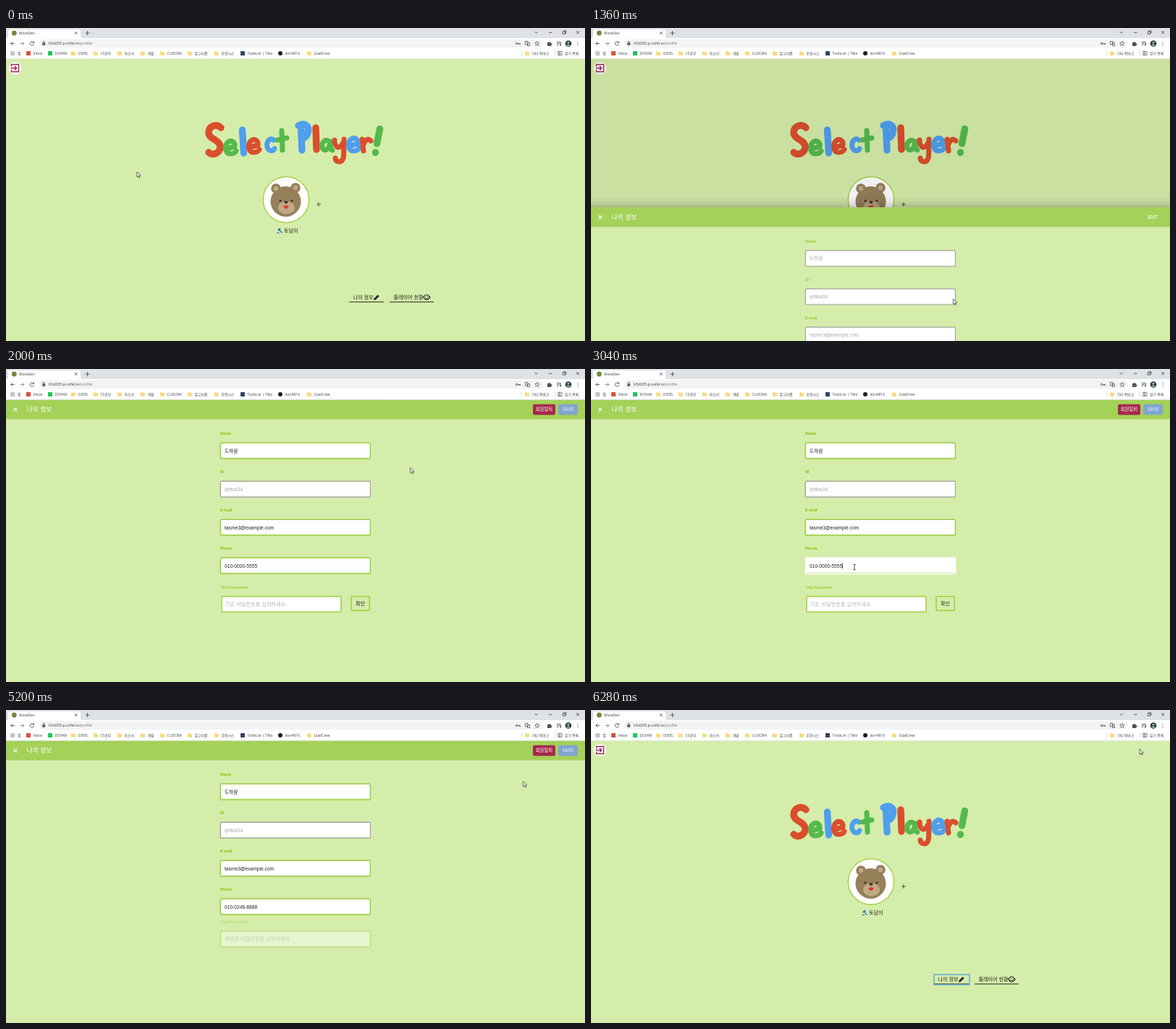
Write an HTML page that moves like this. It is 800 px wide and 433 px high and loops after 6.32 s.

```html
<!DOCTYPE html>
<html lang="ko">
<head>
<meta charset="utf-8">
<title>Profile</title>
<style>
html, body { margin: 0; width: 100%; height: 100%; overflow: hidden; background: #d5edaa; }
svg { display: block; width: 800px; height: 433px; overflow: hidden; }
text { font: 4.9px "Open Sans", "Noto Sans CJK KR", sans-serif; fill: #3c4043; white-space: pre; }
.ko { font: 7.1px "Noto Sans CJK KR", sans-serif; fill: #222; }
.label { font: bold 5.5px "Liberation Sans", sans-serif; fill: #9acd32; }
.value { font: 6.67px "Liberation Sans", "Noto Sans CJK KR", sans-serif; fill: #222; }
.value.off { fill: #a8a8a8; }
.hint { font: 7.2px "Noto Sans CJK KR", sans-serif; fill: #b5b5b5; }
.bar { font: 500 6.4px Roboto, "Noto Sans CJK KR", sans-serif; fill: #fff; }
.heading { font: 8.8px "Noto Sans CJK KR", sans-serif; fill: #fff; }
.line { fill: none; stroke: #505357; stroke-width: .9; }
.box { fill: #fff; stroke: #a2d149; stroke-width: 1.6; }
.box.off { stroke: #a3a59c; stroke-width: 1.2; }
.letters { fill: none; stroke-width: 7; stroke-linecap: round; stroke-linejoin: round; }
.letters .bold { stroke-width: 9.4; }
.red { stroke: #da4e2c; } .green { stroke: #55b94c; } .blue { stroke: #4f9fee; }

#sheet, #dim, #cursor, #fresh { animation: 6320ms linear infinite; }
#edit, #old, #phoneFocus, #passFocus, #key, #ring, #beam, #arrow { animation: 6320ms step-end infinite; }
#sheet { animation-name: slide; }
#dim { animation-name: dim; }
#cursor { animation-name: travel; }
#fresh { animation-name: fresh; }
#edit { animation-name: edit; }
#old { animation-name: old; }
#phoneFocus { animation-name: phoneFocus; }
#passFocus { animation-name: passFocus; }
#key { animation-name: key; }
#ring { animation-name: ring; }
#beam { animation-name: beam; }
#arrow { animation-name: arrow; }

@keyframes slide {
  0%, 20.877% { transform: translateY(391px); visibility: hidden; animation-timing-function: cubic-bezier(0,0,.2,1); }
  24.437%, 88.608% { transform: translateY(0); visibility: visible; animation-timing-function: cubic-bezier(.4,0,.6,1); }
  91.693%, 100% { transform: translateY(391px); visibility: hidden; }
}
@keyframes dim {
  0%, 20.877% { opacity: 0; animation-timing-function: cubic-bezier(.4,0,.2,1); }
  24.437%, 88.608% { opacity: .5; animation-timing-function: cubic-bezier(.4,0,.2,1); }
  91.693%, 100% { opacity: 0; }
}
@keyframes fresh {
  0%, 81.171% { opacity: 0; transform: translateY(-15px); }
  83.703%, 100% { opacity: 1; transform: translateY(0); }
}
@keyframes edit { 0% { opacity: 0; } 29.747% { opacity: 1; } 85.443%, 100% { opacity: 0; } }
@keyframes old { 0% { opacity: 1; } 81.013%, 100% { opacity: 0; } }
@keyframes phoneFocus { 0% { opacity: 0; } 42.405% { opacity: 1; } 69.62%, 100% { opacity: 0; } }
@keyframes passFocus { 0% { opacity: 0; } 69.62% { opacity: 1; } 80.38%, 100% { opacity: 0; } }
@keyframes key { 0% { opacity: 1; } 53.797% { opacity: 0; } 72.785%, 100% { opacity: 1; } }
@keyframes ring { 0% { opacity: 0; } 88.608%, 100% { opacity: 1; } }
@keyframes beam { 0% { opacity: 0; } 39.557% { opacity: 1; } 61.392% { opacity: 0; } 68.829% { opacity: 1; } 78.481%, 100% { opacity: 0; } }
@keyframes arrow { 0% { opacity: 1; } 39.557% { opacity: 0; } 61.392% { opacity: 1; } 68.829% { opacity: 0; } 78.481%, 100% { opacity: 1; } }
@keyframes travel {
  0% { transform: translate(181px,199px); }
  7.911% { transform: translate(230px,215px); }
  14.24% { transform: translate(440px,345px); }
  18.99% { transform: translate(498px,374px); }
  22.15% { transform: translate(501px,375px); }
  26.58% { transform: translate(690px,150px); }
  28.48% { transform: translate(776px,54px); }
  30.38% { transform: translate(783px,52px); }
  31.646% { transform: translate(559px,136px); }
  36.7% { transform: translate(430px,312px); }
  39.87%, 61.7% { transform: translate(364px,274px); }
  63.92%, 67.1% { transform: translate(260px,265px); }
  68.99%, 77.5% { transform: translate(372px,325px); }
  79.43% { transform: translate(488px,325px); }
  80.7% { transform: translate(490px,325px); }
  82.278% { transform: translate(714px,99px); }
  84.18% { transform: translate(775px,54px); }
  85.76% { transform: translate(778px,55px); }
  88.29% { transform: translate(13px,56px); }
  89.24% { transform: translate(14px,57px); }
  92.405% { transform: translate(158px,270px); }
  97.15% { transform: translate(740px,70px); }
  98.73%, 100% { transform: translate(758px,54px); }
}
</style>
</head>
<body>
<svg viewBox="0 0 800 433">
  <defs>
    <path id="e" d="M-6 2L5-1C6-7 1-10-3-8C-10-4-9 9-1 9C3 9 6 7 7 5"/>
    <path id="folder" fill="#f9d978" d="M0-2.7h2.4l.8.9H6v4.6H0z"/>
    <linearGradient id="shade" x2="0" y2="1">
      <stop offset="0" stop-opacity="0"/><stop offset=".5" stop-opacity=".04"/><stop offset="1" stop-opacity=".17"/>
    </linearGradient>
  </defs>

  <g id="page">
    <rect y="42" width="800" height="391" fill="#d5edaa"/>
    <circle cx="12.5" cy="55.5" r="8.6" fill="#fff"/>
    <path d="M7.5 53.5v-3h10v10h-10v-3M6.5 55.5h8M12 52.8l2.7 2.7-2.7 2.7" fill="none" stroke="#9a2150" stroke-width="1.4" stroke-linejoin="round"/>

    <g class="letters" role="img" aria-label="Select Player!">
      <path class="red bold" d="M297 138C291 132 280 135 280 145C281 155 296 154 296 165C295 174 285 177 280 172"/>
      <use class="green" href="#e" x="311" y="165"/>
      <path class="blue bold" d="M326.500 141L328.500 173"/>
      <use class="red" href="#e" x="343" y="163"/>
      <path class="blue" d="M370 155C365 150 359 158 361 165C363 171 369 171 371 167"/>
      <path class="green" d="M381 142L382 169M375 155L388 152"/>
      <path class="blue bold" d="M407.500 137L409 169M404 135C413 130 419 136 417.500 143C416.500 149 413 152 409 153"/>
      <path class="red bold" d="M428 138L429 168"/>
      <path class="green" d="M447 158C442 151 435 159 437 166C440 172 447 168 448 157C448 163 448 168 451 169"/>
      <path class="red" d="M454 155C454 166 461 168 465 160M467 154C466 170 469 184 461 185C457 185 455 183 455 180"/>
      <use class="blue" href="#e" x="481" y="161"/>
      <path class="red" d="M492 154L494 170M494 161C496 155 500 152 504 156"/>
      <path class="green bold" d="M516.500 139.500L512.500 160M510.500 172v.4"/>
    </g>

    <circle cx="387" cy="237.5" r="31.7" fill="#fff" stroke="#9acd32" stroke-width="1.3"/>
    <g fill="#96805a">
      <circle cx="373" cy="222" r="6.8"/><circle cx="400" cy="221" r="6.8"/>
      <circle cx="386.5" cy="240" r="21"/>
    </g>
    <g fill="#bfa987">
      <circle cx="373" cy="222" r="3.2"/><circle cx="400" cy="221" r="3.2"/>
      <ellipse cx="387.5" cy="248.5" rx="11.5" ry="9"/>
    </g>
    <g fill="#3b2a20">
      <circle cx="379" cy="239" r="1.4"/><circle cx="395" cy="239" r="1.4"/>
      <ellipse cx="387" cy="241" rx="2.6" ry="1.8"/>
    </g>
    <path d="M383.5 246q3.5-1.5 7 0q-.5 4-3.5 4t-3.5-4z" fill="#df3f2b"/>
    <path d="M428.8 244h6M431.8 241v6" stroke="#333" stroke-width=".8"/>
    <g stroke="#2374b8" fill="none"><path stroke-width="2.4" d="M376 280l3-2.6"/><path stroke-width="1.2" d="M377.5 279.5l4 4M374 283.5h4"/></g>
    <text class="ko" x="384" y="282.6">토담이</text>

    <text class="ko" x="479.5" y="374.8">나의 정보</text>
    <path d="M508 376.5l.6-2.4 5-5 2 2-5 5z" fill="#222"/>
    <text class="ko" x="535.5" y="374.8">플레이어 현황</text>
    <g class="line" style="stroke:#222;stroke-width:1">
      <circle cx="581.2" cy="372.5" r="3.7"/><path d="M578.8 373.5q2.4 2.4 4.8 0M579.5 371.3h1M582 371.3h1M577.5 371l-1.5 1.5 1.5 1.5M585 371l1.5 1.5-1.5 1.5"/>
      <path stroke-width="1.2" d="M474.5 379h47.5M530 379h61"/>
    </g>
    <rect id="ring" x="474" y="366" width="49" height="14" fill="none" stroke="#4a9ae0" stroke-width="1.2"/>
  </g>

  <rect id="dim" y="42" width="800" height="391"/>

  <g id="sheet">
    <rect y="26.5" width="800" height="16" fill="url(#shade)"/>
    <rect y="42.5" width="800" height="391" fill="#d5edaa"/>
    <rect y="69" width="800" height="1" fill="#c6e094"/>
    <rect y="42.5" width="800" height="26.7" fill="#a4d158"/>
    <path d="M10.4 53.6l5 5M15.4 53.6l-5 5" stroke="#fff" stroke-width="1.1"/>
    <text class="heading" x="28.5" y="59.2">나의 정보</text>
    <text class="bar" x="769.5" y="58.4">EDIT</text>
    <g id="view"></g>
    <g id="edit">
      <rect x="728" y="48.8" width="31" height="14.6" rx="1.8" fill="#a5284b"/>
      <text class="bar" x="743.5" y="58.4" text-anchor="middle">회원탈퇴</text>
      <rect x="763" y="48.8" width="27" height="14.6" rx="1.8" fill="#80a6cf"/>
      <text class="bar" x="776.5" y="58.4" text-anchor="middle" style="fill:#d3e4f3">SAVE</text>
      <g id="fields"></g>
      <g id="phoneFocus">
        <rect x="295.5" y="260.3" width="209" height="24" fill="#fff"/>
        <path d="M297 282.3h206" stroke="#bfe07e" stroke-width=".9"/>
        <text class="value phone" x="302" y="274.6"></text>
        <path class="caret" d="M0 268.5v7.5" stroke="#111" stroke-width=".7"/>
      </g>
      <g id="old">
        <text class="label" x="297" y="303.5">Old Password</text>
        <rect class="box" x="298" y="314.6" width="165" height="21.4" rx="1"/>
        <g id="passFocus">
          <rect x="297" y="313.5" width="167" height="24" fill="#fff"/>
          <path d="M299 335.5h163" stroke="#bfe07e" stroke-width=".9"/>
          <path class="caret" d="M0 321v7.5" stroke="#111" stroke-width=".7"/>
        </g>
        <text id="hint" class="hint" x="303" y="327.6">기존 비밀번호를 입력하세요</text>
        <text id="pass" class="value" x="303.5" y="327.4"></text>
        <rect x="477" y="314.6" width="25.3" height="19.4" rx="1" fill="none" stroke="#9acd32" stroke-width="1.4"/>
        <text class="ko" x="489.6" y="326.8" text-anchor="middle">확인</text>
      </g>
      <g id="fresh">
        <text class="label" x="296" y="303.5">New Password</text>
        <rect class="box" x="296.4" y="314.6" width="207" height="21.4" rx="1"/>
        <text class="hint" x="302" y="327.6">새로운 비밀번호를 입력하세요</text>
      </g>
    </g>
  </g>

  <g id="browser">
    <rect width="800" height="42.5" fill="#fff"/>
    <rect width="800" height="14" fill="#dee1e6"/>
    <path d="M0 14q3 0 3-3V5q0-3 3-3H100q3 0 3 3v6q0 3 3 3z" fill="#fff"/>
    <circle cx="11.3" cy="7" r="3.4" fill="#708a3c"/>
    <text x="18" y="8.8">MoveDen</text>
    <rect x="46" y="15.6" width="696" height="11.6" rx="5.8" fill="#f1f3f4"/>
    <text x="59" y="23.4" style="font-size:5.3px">k5d205.p.osfel.io<tspan fill="#74787c">/profile</tspan></text>
    <g class="line">
      <path d="M95 5.2l3.6 3.6M98.6 5.2l-3.6 3.6M109.5 7h6M112.5 4v6M730.5 5l2.2 2.2 2.2-2.2M750 6.3h4.5M769.3 4.8h3.4v3.4h-3.4zM770.5 4.8v-1h3.4v3.4h-1M788 4l4.2 4.2M792.2 4l-4.2 4.2"/>
      <path d="M12 21.5H6.8M9.2 19L6.7 21.5 9.2 24"/>
      <path style="stroke:#85898d" d="M19.5 21.5h5.2M22.3 19l2.5 2.5-2.5 2.5"/>
      <path d="M38.2 20A2.7 2.7 0 1 0 38.5 22.3M38.6 18.5v2h-2"/>
      <path d="M51 21v-1.2a1.2 1.2 0 0 1 2.4 0V21"/>
      <path d="M733.9 18.3l.9 2.2 2.3.1-1.8 1.5.6 2.3-2-1.3-2 1.3.6-2.3-1.8-1.5 2.3-.1z" stroke-width=".7"/>
      <path d="M761 19.5h5M761 21.5h4M761 23.5h2M766.5 19.5v3.5"/>
      <path d="M717.5 18.5h3.5v4.5h-3.5zM720.5 20.5h3v4h-3z" stroke-width=".8"/>
    </g>
    <g fill="#505357">
      <rect x="50.3" y="20.8" width="3.8" height="3" rx=".4"/>
      <path d="M748 20h1.7a1 1 0 1 1 2 0h1.5v1.7a1 1 0 1 1 0 1.8V25H748z"/>
      <circle cx="766" cy="23.4" r="1.1"/>
      <circle cx="790" cy="19.3" r=".6"/><circle cx="790" cy="21.5" r=".6"/><circle cx="790" cy="23.7" r=".6"/>
    </g>
    <g id="key" class="line"><circle cx="705.6" cy="21.5" r="1.3"/><path d="M707 21.5h3.5v1.5M709 21.5v1.3"/></g>
    <circle cx="777" cy="21.5" r="4.3" fill="#283f45"/>
    <circle cx="777" cy="20.2" r="1.4" fill="#a9bab9"/><path d="M774.2 24.6q2.8-4.5 5.6 0z" fill="#a9bab9"/>
    <g id="marks"></g>
    <path d="M712.5 31v8M758.5 31v8" stroke="#c9ccd0" stroke-width=".6"/>
    <path d="M762.8 32.3h5.2v5.2h-5.2zM764.5 32.3v5.2M765.5 34h1.5M765.5 36h1.5" class="line" style="stroke-width:.7"/>
    <path d="M0 42.3h800" stroke="#dcdfe2" stroke-width=".6"/>
  </g>

  <g id="cursor">
    <path id="arrow" d="M0 0v7.2l1.7-1.5 1.2 2.6 1.2-.6-1.1-2.5h2.2z" fill="#fff" stroke="#222" stroke-width=".7"/>
    <path id="beam" d="M-1.6-3.6H1.6M0-3.6V3.6M-1.6 3.6H1.6" fill="none" stroke="#222" stroke-width=".8"/>
  </g>
</svg>

<script>
const LOOP = 6320;
const before = "010-0000-5555", after = "010-0246-8888", kept = 4;
const $ = id => document.getElementById(id);
const clamp = (n, max) => Math.max(0, Math.min(max, Math.floor(n)));

// Bookmarks: x, label, icon colour (a folder when left out), round icon
const marks = [
  [28, "Inbox", "#d9503f"], [58, "DOVAN", "#1ec85a"], [90, "OSFEL"], [121, "CS공부"], [154, "자소서"],
  [186, "개발"], [213, "CLIDORA"], [251, "알고리즘"], [288, "추천시스"], [324, "TodoList | Tilko", "#33475f"],
  [376, "dori4816", "#1d2024", true], [416, "GladCrew"], [717, "기타 북마크"]
];
const icon = (x, color, round) => color
  ? `<rect x="${x}" y="32" width="6" height="6" rx="${round ? 3 : .6}" fill="${color}"/>`
  : `<use href="#folder" x="${x}" y="35"/>`;
const dots = [...Array(9).keys()].map(i =>
  `<rect x="${6.5 + i % 3 * 2}" y="${32.5 + (i / 3 | 0) * 2}" width="1.3" height="1.3" fill="${["#dd5144", "#4a9a5c", "#4a7fd0"][i % 3]}"/>`);
$("marks").innerHTML = dots.join("") + `<text x="16" y="36.8">앱</text><text x="772" y="36.8">읽기 목록</text>` +
  marks.map(([x, label, color, round]) => icon(x, color, round) + `<text x="${x + 9.6}" y="36.8">${label}</text>`).join("");

const fields = [["Name", "도하람"], ["ID", "qhfkal34"], ["E-mail", "tasme3@example.com"], ["Phone", ""]];
const form = editing => fields.map(([label, value], i) => {
  const y = 102.3 + i * 53, off = editing && label !== "ID" ? "" : " off";
  const phone = label === "Phone" ? " phone" : "";
  return `<text class="label" x="296" y="${y - 11}">${label}</text>
    <rect class="box${off}" x="296.4" y="${y}" width="207" height="21.8" rx="1"/>
    <path d="M298 ${y + 20.2}h204" stroke="#e3ead6" stroke-width=".8"/>
    <text class="value${off}${phone}" x="302" y="${y + 13.3}">${value}</text>`;
}).join("");
$("view").innerHTML = form(false);
$("fields").innerHTML = form(true);

const phones = document.querySelectorAll(".phone");
const typed = document.querySelector("#phoneFocus .phone");
const phoneCaret = document.querySelector("#phoneFocus .caret");
const passCaret = document.querySelector("#passFocus .caret");
const clock = $("sheet").getAnimations()[0];

function phoneAt(t) {
  return t < 3600
    ? before.slice(0, before.length - clamp((t - 3280) / 32, 9))
    : after.slice(0, kept + clamp((t - 3600) / 72, 9));
}

function draw() {
  const t = (clock.currentTime || 0) % LOOP;
  const phone = phoneAt(t), secret = "•".repeat(clamp((t - 4560) / 45, 8));
  phones.forEach(el => { el.textContent = phone; });
  $("pass").textContent = secret;
  $("hint").style.display = secret ? "none" : "";
  phoneCaret.setAttribute("transform", `translate(${302.3 + typed.getComputedTextLength()})`);
  passCaret.setAttribute("transform", `translate(${303.5 + $("pass").getComputedTextLength()})`);
  requestAnimationFrame(draw);
}
draw();
</script>
</body>
</html>
```
